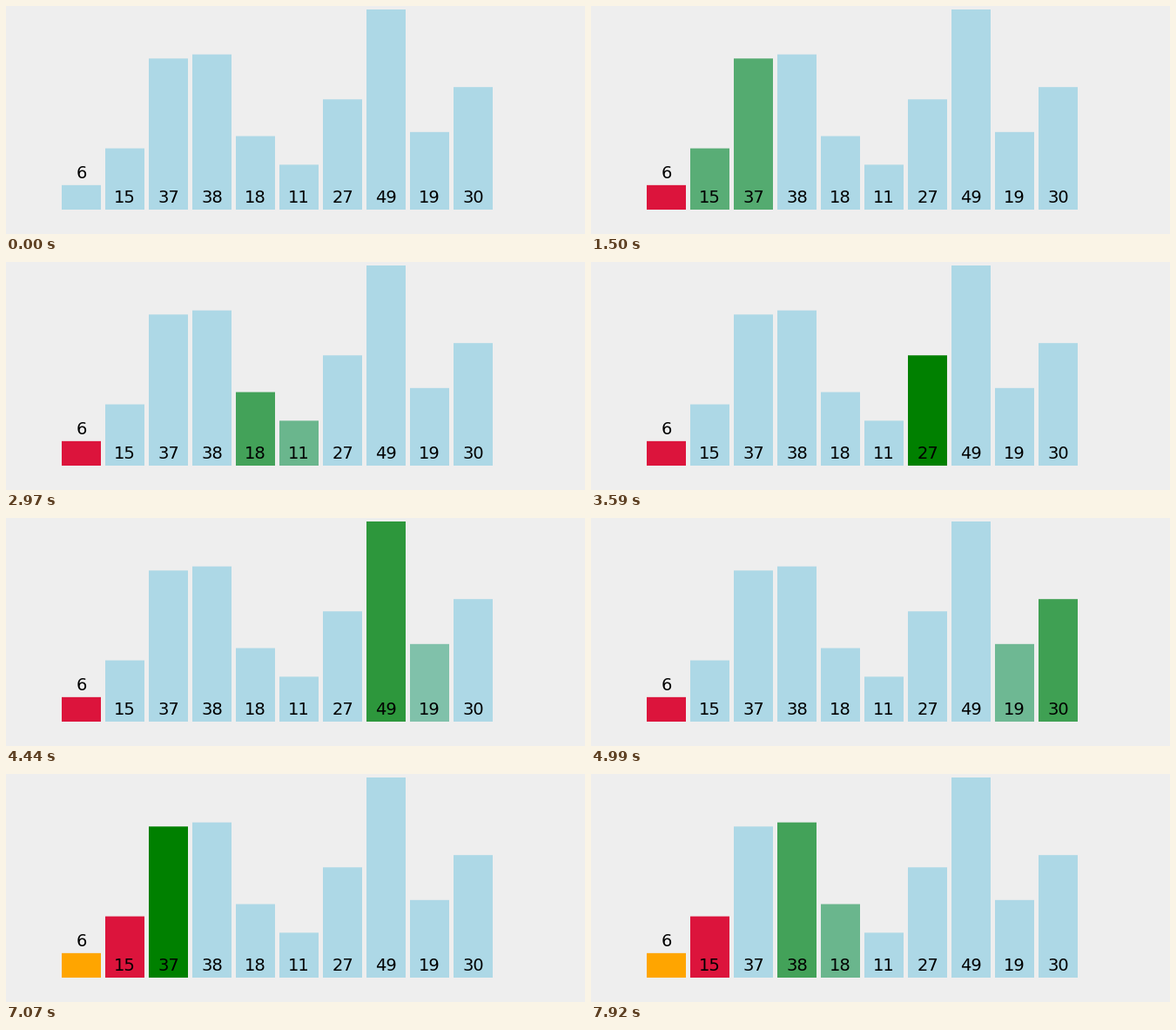
A matplotlib script that plays this animation: 665 by 262 pixels, repeating every 7990 ms.

```python
import matplotlib.pyplot as plt
import numpy as np
from matplotlib.animation import FuncAnimation
from matplotlib.colors import to_rgb
from matplotlib.patches import Rectangle

W, H, DPI = 665, 262, 100
LOOP, TICK = 7990, 10

VALUES = [6, 15, 37, 38, 18, 11, 27, 49, 19, 30]
LEFT, PITCH, BAR_W, BASE = 64, 50, 45, 234
UNIT = 230 / max(VALUES)
LABEL_ROOM = 28.5

IDLE, SCAN, PIVOT, SORTED = (
    np.array(to_rgb(c)) for c in ("lightblue", "green", "crimson", "orange"))

# The picture refreshes at a coarse, steady rate (ms);
# the sort's own timing is counted in these refreshes.
REFRESH, PHASE = 77.3, 22
START, PERIOD, FADE = 5.38, 6.4, 1.6


def sort_steps():
    """Colour changes {bar: colour} of a selection sort, step by step."""
    n = len(VALUES)
    for pivot in range(n):
        yield {pivot: PIVOT}
        for i in range(pivot + 1, n):
            step = {i: SCAN}
            if i > pivot + 1:
                step[i - 1] = IDLE
            yield step
        if pivot < n - 1:
            yield {n - 1: IDLE}
        yield {pivot: SORTED}


def bar_colors(t):
    refresh = (t - PHASE) // REFRESH
    colors = [IDLE] * len(VALUES)
    for step, changes in enumerate(sort_steps()):
        p = (refresh - START - PERIOD * step) / FADE
        if p <= 0:
            break
        for bar, goal in changes.items():
            colors[bar] = colors[bar] + (goal - colors[bar]) * min(p, 1)
    return colors


fig = plt.figure(figsize=(W / DPI, H / DPI), dpi=DPI, facecolor="#eeeeee")
ax = fig.add_axes([0, 0, 1, 1])
ax.set_xlim(0, W)
ax.set_ylim(H, 0)
ax.axis("off")

bars = []
for i, value in enumerate(VALUES):
    x, height = LEFT + PITCH * i, value * UNIT
    bars.append(ax.add_patch(Rectangle(
        (x, BASE - height), BAR_W, height, lw=0, color=IDLE, snap=False)))
    # A bar too short for its label carries it on top
    floor = BASE if height > LABEL_ROOM else BASE - height
    ax.text(x + BAR_W / 2, round(floor) - 8, str(value), ha="center",
            va="baseline", family="DejaVu Sans", fontsize=19.5 * 72 / DPI,
            color="black")


def update(frame):
    for bar, color in zip(bars, bar_colors(frame * TICK)):
        bar.set_facecolor(color)
    return bars


anim = FuncAnimation(fig, update, frames=LOOP // TICK, interval=TICK,
                     repeat=True, repeat_delay=0)
plt.show()
```
